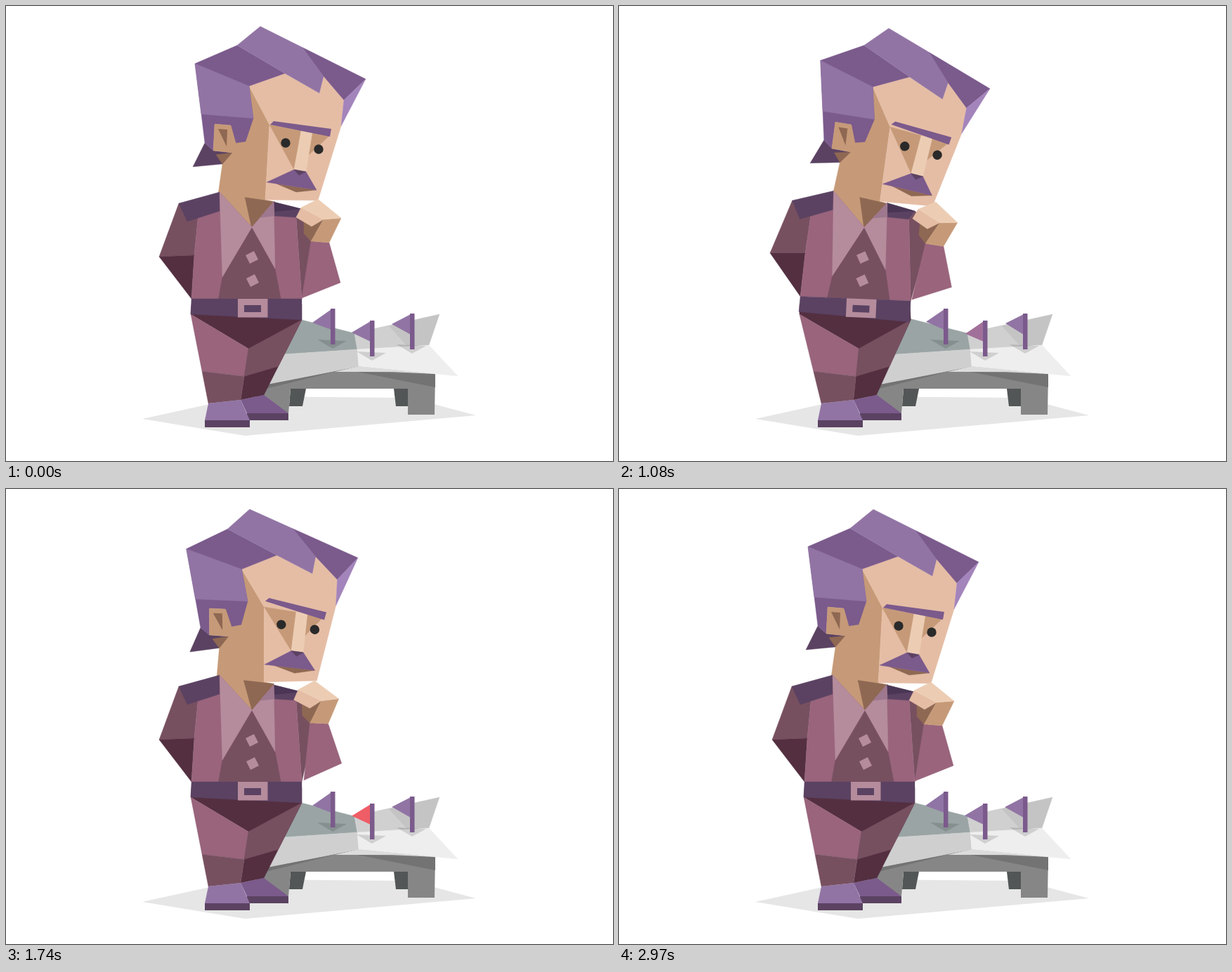
Animation of 864x648 px, one loop 3 s. Source, as an HTML page with a canvas:

```html
<!DOCTYPE html>
<html lang="en">
<head>
<meta charset="utf-8">
<title>Thinker</title>
<style>
html, body { margin: 0; width: 100%; height: 100%; overflow: hidden; background: #fff; }
canvas { display: block; }
</style>
</head>
<body>
<canvas id="stage" width="864" height="648"></canvas>
<script>
const ctx = document.getElementById('stage').getContext('2d');
const LOOP = 3000;
const C = {
  lilac: '#9174a4', violet: '#7b5a8c', pale: '#a384bb', plum: '#5b4262', night: '#4a3654',
  skin: '#e5bda5', light: '#eccdb4', tan: '#c69a78', brown: '#8f6853',
  rose: '#99647c', wine: '#775060', dark: '#532f40', pink: '#b58c9c', mauve: '#9d788e',
  grey: '#868686', slate: '#525656', shade: '#737373'
};

const ease = u => (1 - Math.cos(Math.PI * Math.min(1, Math.max(0, u)))) / 2;
const lerp = (a, b, u) => a.map((v, i) => v + (b[i] - v) * u);

// Rises from 0 to 1 over [a, b], falls back over [c, d].
const swell = (t, a, b, c, d) => ease((t - a) / (b - a)) * ease((d - t) / (d - c));

function poly(color, ...points) {
  ctx.beginPath();
  for (const p of points) ctx.lineTo(...p);
  ctx.closePath();
  ctx.fillStyle = color;
  ctx.fill();
}

// Returns a painter of facets whose corners are named key points.
const facets = pts => (color, names) => {
  poly(color, ...names.split(' ').map(n => pts[n]));
  ctx.strokeStyle = color;
  ctx.lineWidth = 0.4;
  ctx.stroke();
};

function rect(color, x, y, w, h) {
  ctx.fillStyle = color;
  ctx.fillRect(x, y, w, h);
}

function diamond(color, x, y, size) {
  ctx.save();
  ctx.translate(x, y);
  ctx.rotate(-0.47);
  rect(color, -size / 2, -size / 2, size, size);
  ctx.restore();
}

// Draws with a tilt matrix around the point (x, y).
function tilted(x, y, b, c, d, draw) {
  ctx.save();
  ctx.translate(x, y);
  ctx.transform(1, b, c, d, 0, 0);
  ctx.translate(-x, -y);
  draw();
  ctx.restore();
}

const map = {
  left: [405, 443], ridge: [496, 466], right: [617, 439], foldL: [380, 497], mid: [500, 489],
  foldR: [602, 483], base: [360, 541], low: [502, 513], corner: [643, 527]
};
map.crestTop = lerp(map.ridge, map.right, 0.4);
map.crestLow = lerp(map.mid, map.foldR, 0.7);

function table() {
  const { base, low } = map, edge = [611, 524], bend = [468, 521];
  poly('#e6e6e6', [194, 588], [340, 556], [575, 558], [669, 583], [340, 612]);
  poly(C.slate, [405, 545], [427, 545], [422, 570], [403, 570]);
  poly(C.slate, [552, 545], [573, 545], [573, 570], [555, 570]);
  poly(C.grey, base, low, edge, [610, 582], [572, 582], [572, 545], [405, 545], [402, 580], [355, 555]);
  poly(C.shade, base, bend, [370, 545]);
  poly(C.shade, [500, 521], edge, [611, 543]);
  poly('#dcdcdc', bend, low, edge, [550, 521]);

  const paint = facets(map);
  paint('#9aa4a4', 'left ridge mid foldL');
  paint('#cfcfcf', 'foldL mid low base');
  paint('#c4c4c4', 'ridge right foldR mid');
  paint('#d0d0d0', 'ridge crestTop crestLow mid');
  paint('#eeeeee', 'mid foldR corner low');
}

const flags = [
  { x: 575, y: 438, drop: 15, lift: -3, hue: [234, 181, 64] },
  { x: 518, y: 448, drop: 17, lift: 5, hue: [239, 93, 102] },
  { x: 462, y: 431, drop: 20, lift: -4, hue: [69, 151, 184] }
];

// The flags light up one after another, a second each.
function drawFlags(t) {
  const wave = (1 - Math.cos(2 * Math.PI * t / 600)) / 2;
  flags.forEach(({ x, y, drop, lift, hue }, i) => {
    const s = t - 1000 * i, foot = y + 51;
    const color = `rgb(${lerp([145, 116, 164], hue, swell(s, 0, 300, 750, 1000))})`;
    poly('rgba(0,0,0,.13)', [x - 19, foot - 7], [x + 23, foot - 5], [x + 3, foot + 6]);
    poly(color, [x + 1, y + 1], [x + 1, y + 30], [x - 26 + 3 * wave, y + drop + lift * wave]);
    rect(C.violet, x, y, 6.5, 51);
  });
}

const leg = {
  hipL: [263, 439], hipR: [421, 447], beltL: [264, 425], beltR: [421, 425], crotch: [345, 488],
  ankleL: [288, 566], ankleM: [334, 561], ankleR: [367, 554]
};
leg.kneeL = lerp(leg.hipL, leg.ankleL, 0.64);
leg.kneeM = lerp(leg.crotch, leg.ankleM, 0.54);
leg.kneeR = lerp(leg.hipR, leg.ankleR, 0.62);

function legs() {
  const paint = facets(leg);
  paint(C.dark, 'beltL beltR hipR ankleR ankleM crotch hipL');
  paint(C.rose, 'hipL crotch kneeM kneeL');
  paint(C.wine, 'hipR crotch kneeM kneeR');
  paint(C.wine, 'kneeL kneeM ankleM ankleL');
}

function boot(color, back, front, heel, toe, y) {
  poly(color, back, front, [toe, y], [heel, y]);
  rect(C.plum, heel, y, toe - heel, 10);
}

const body = {
  shoulderL: [246, 281], collarL: [304, 265], padL: [304, 292], padTip: [258, 307],
  elbow: [218, 357], crook: [268, 355], waistL: [264, 417], waistR: [421, 417],
  hemL: [263, 439], hemR: [421, 447], knot: [350, 315], lapelL: [308, 386], lapelR: [383, 374],
  collarR: [381, 279], padR: [382, 299], shoulderR: [421, 289], cuff: [413, 301],
  sleeveTop: [440, 303], sleeveLow: [440, 335]
};
body.seam = lerp(body.padTip, body.padL, 0.33);
body.vestL = lerp(body.waistL, body.waistR, 0.245);
body.vestR = lerp(body.waistL, body.waistR, 0.81);
body.fold = lerp(body.collarR, body.knot, 0.62);

function torso() {
  const paint = facets(body);
  paint(C.wine, 'shoulderL seam crook elbow');
  paint(C.dark, 'elbow crook waistL');
  paint(C.wine, 'cuff shoulderR sleeveTop sleeveLow waistR');
  paint(C.rose, 'seam collarL knot collarR cuff waistR waistL crook');
  paint(C.plum, 'shoulderL collarL padL padTip');
  paint(C.plum, 'collarR shoulderR cuff padR');
  poly(C.night, body.collarR, body.shoulderR, [382, 293]);
  paint(C.wine, 'knot lapelR vestR vestL lapelL');
  paint(C.pink, 'collarL knot lapelL');
  paint(C.pink, 'collarR knot lapelR');
  paint(C.mauve, 'collarR padR fold');
  for (const y of [358, 391]) diamond(C.pink, 350 + (y - 358) / 33, y, 13.4);
  paint(C.plum, 'waistL waistR hemR hemL');
  rect(C.pink, 330, 417, 42.5, 26.5);
  rect(C.plum, 339, 426, 24, 10);
}

const face = {
  crown: [362, 29], crest: [329, 56], back: [269, 82], parting: [397, 96], temple: [346, 114],
  widow: [452, 100], lock: [446, 124], tip: [512, 104], side: [481, 134], cheek: [477, 171],
  nape: [278, 154], burn: [352, 160], burnLow: [341, 193], burnIn: [327, 195],
  earTop: [297, 168], earFront: [320, 170], lobe: [295, 206], lobeFront: [322, 209],
  behind: [283, 195], tail: [266, 229], neck: [308, 225], brow: [375, 169],
  jaw: [369, 276], chin: [444, 277], throat: [340, 272], collar: [383, 279], pit: [350, 318],
  shirt: [301, 275], bridgeL: [420, 178], bridgeR: [436, 180], noseL: [410, 233], noseR: [427, 236],
  nostril: [417, 241], socket: [460, 185], lid: [430, 213],
  lipL: [371, 251], lipR: [442, 262], mouth: [413, 265]
};
face.swirl = lerp(face.crown, face.tip, 0.4);
face.grin = lerp(face.lipL, face.lipR, 0.2);
face.gap = lerp(face.neck, face.lobe, 0.7);
const paintFace = facets(face);

function neck() {
  paintFace(C.tan, 'lobeFront neck shirt pit collar jaw');
  paintFace(C.brown, 'throat collar pit');
}

function head(browTilt) {
  const paint = paintFace;
  paint(C.plum, 'behind tail neck lobeFront lobe');
  paint(C.tan, 'temple brow jaw throat neck lobeFront earFront');
  paint(C.brown, 'gap lobeFront neck');
  paint(C.skin, 'temple parting lock widow side cheek chin jaw brow');
  paint(C.violet, 'back crest parting temple burn burnLow burnIn earFront earTop lobe behind nape');
  paint(C.lilac, 'back temple burn nape');
  paint(C.lilac, 'crest crown swirl widow lock parting');
  paint(C.violet, 'swirl tip side widow');
  paint(C.pale, 'tip side cheek');
  paint(C.tan, 'earTop earFront burnIn lobeFront lobe');
  poly(C.brown, [302, 175], [315, 176], [314, 200]);

  paint(C.tan, 'brow bridgeL noseL');
  paint(C.tan, 'bridgeR socket lid');
  paint(C.light, 'bridgeL bridgeR noseR noseL');
  for (const x of [398, 445]) {
    ctx.beginPath();
    ctx.arc(x, 195 + (x - 398) * 0.19, 6.7, 0, 2 * Math.PI);
    ctx.fillStyle = '#2a2a2a';
    ctx.fill();
  }
  paint(C.brown, 'grin lipR mouth');
  paint(C.violet, 'lipL noseL noseR lipR');
  paint(C.plum, 'noseL noseR nostril');
  tilted(430, 175, browTilt, -browTilt, 1, () =>
    poly(C.violet, [376, 169], [381, 164], [463, 175], [461, 186]));
}

const hand = {
  palm: [420, 287], knuckle: [444, 275], wrist: [477, 302], fold: [452, 304], thumb: [435, 314],
  finger: [413, 301], heel: [424, 324], cuffIn: [434, 335], cuffOut: [460, 337],
  elbow: [476, 394], tuck: [421, 416]
};
hand.hollow = lerp(hand.finger, hand.thumb, 0.5);

function arm() {
  const paint = facets(hand);
  paint(C.rose, 'cuffIn cuffOut elbow tuck');
  paint(C.brown, 'hollow fold cuffIn heel');
  paint(C.tan, 'fold wrist cuffOut cuffIn');
  paint(C.skin, 'palm fold thumb finger');
  paint(C.light, 'palm knuckle wrist fold');
}

function render(t) {
  const lean = 0.056 * swell(t, 0, 700, 900, 1650);
  const bow = swell(t, 0, 700, 800, 1750);
  const rear = swell(t, 800, 1750, 1850, 2370);
  const nod = 0.104 * bow - 0.038 * rear;
  const shift = 0.055 * rear - 0.113 * bow;
  const browTilt = 0.152 * swell(t, 850, 1350, 1700, 2350);
  const squash = 1 - 0.045 * Math.abs(shift);

  rect('#fff', 0, 0, 864, 648);
  table();
  drawFlags(t);
  tilted(0, 566, 0, lean, 1, legs);
  boot(C.violet, leg.ankleM, leg.ankleR, 343, 402, 580);
  boot(C.lilac, leg.ankleL, leg.ankleM, 283, 347, 590);
  tilted(340, 306, nod, shift, squash, neck);
  tilted(346, 295, lean * 0.85, -lean, 1, torso);
  tilted(340, 306, nod, shift, squash, () => head(browTilt));
  tilted(390, 362, nod, shift, 1, arm);
}

const begin = performance.now();
function frame() {
  render((performance.now() - begin) % LOOP);
  requestAnimationFrame(frame);
}
frame();
</script>
</body>
</html>
```
